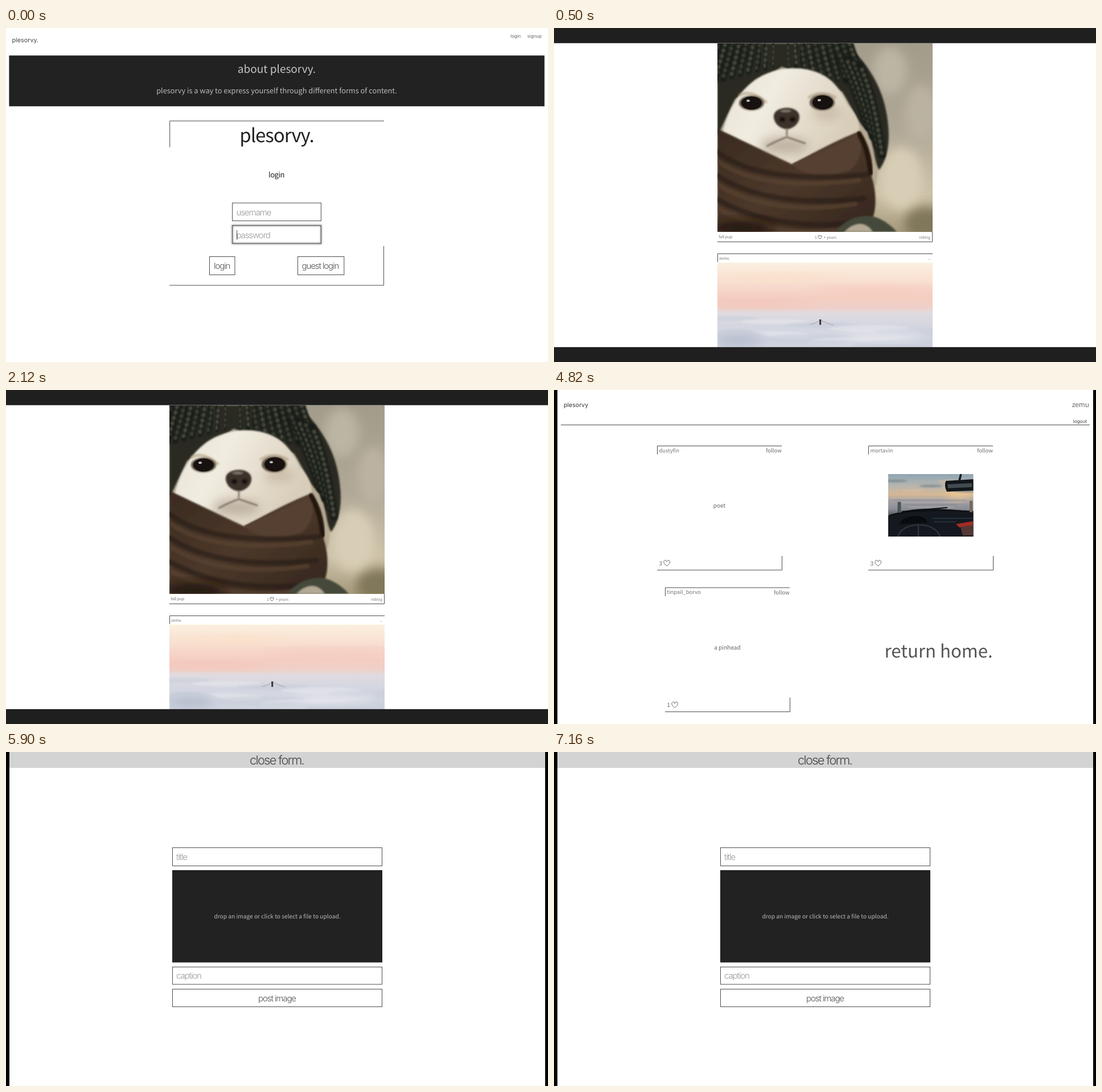
Write an HTML page that moves like this. It is 952x588 px and loops after 8000 ms.

```html
<!DOCTYPE html>
<html lang="en">
<head>
<meta charset="utf-8">
<title>plesorvy</title>
<style>
html, body { margin: 0; width: 100%; height: 100%; overflow: hidden; background: #fff; }
svg { display: block; width: 100vw; height: 100vh; }
text { font-family: 'Noto Sans CJK SC', 'Noto Sans CJK JP', 'Noto Sans', sans-serif; font-weight: 300; text-rendering: geometricPrecision; white-space: pre; }
.ui { font-family: Inter, Roboto, sans-serif; }
.reg { font-weight: 400; }
.line { fill: none; stroke: #4c4c4c; stroke-width: 1; }
</style>
</head>
<body>
<svg id="stage" viewBox="0 0 952 588">
<defs>
  <filter id="soft" x="-20%" y="-20%" width="140%" height="140%"><feGaussianBlur stdDeviation="1.6"/></filter>
  <filter id="haze" x="-50%" y="-50%" width="200%" height="200%"><feGaussianBlur stdDeviation="9"/></filter>
  <clipPath id="pupClip"><rect x="287" y="27" width="378" height="332"/></clipPath>
  <clipPath id="skyClip"><rect x="287" y="413" width="378" height="149"/></clipPath>
  <clipPath id="carClip"><rect x="587" y="148" width="149.5" height="110"/></clipPath>
  <linearGradient id="wall" x1="0" y1="0" x2="0" y2="1">
    <stop offset="0" stop-color="#a39c8b"/><stop offset=".45" stop-color="#b0a897"/>
    <stop offset=".8" stop-color="#cdc2a8"/><stop offset="1" stop-color="#a69b7d"/>
  </linearGradient>
  <linearGradient id="fur" x1="0" y1="0" x2="1" y2=".4">
    <stop offset="0" stop-color="#e9e2d4"/><stop offset=".4" stop-color="#f1ece1"/><stop offset="1" stop-color="#d8cdb9"/>
  </linearGradient>
  <linearGradient id="scarf" x1="0" y1="0" x2="1" y2="1">
    <stop offset="0" stop-color="#3a2a20"/><stop offset=".5" stop-color="#4c382a"/><stop offset="1" stop-color="#33251c"/>
  </linearGradient>
  <linearGradient id="sky" x1="0" y1="0" x2="0" y2="1">
    <stop offset="0" stop-color="#fbf0e0"/><stop offset=".2" stop-color="#f9e1d2"/>
    <stop offset=".42" stop-color="#f4cdc1"/><stop offset=".53" stop-color="#efd0c8"/>
    <stop offset=".6" stop-color="#dfdbe0"/><stop offset=".75" stop-color="#d3d6e0"/><stop offset="1" stop-color="#d8dbe4"/>
  </linearGradient>
  <linearGradient id="dusk" x1="0" y1="0" x2="0" y2="1">
    <stop offset="0" stop-color="#8fa6b4"/><stop offset=".2" stop-color="#b9b6ad"/>
    <stop offset=".33" stop-color="#d6b795"/><stop offset=".42" stop-color="#a3a1a3"/>
    <stop offset=".56" stop-color="#8b8d96"/><stop offset=".66" stop-color="#59595c"/>
  </linearGradient>
</defs>
</svg>
<script>
const stage = document.getElementById('stage');
const LOOP = 8000;
const starts = [0, 500, 3200, 5900];

const text = (x, y, size, str, fill = '#6c6c6c', opt = {}) =>
  `<text x="${x}" y="${y}" font-size="${size}" fill="${fill}" text-anchor="${opt.at || 'start'}" class="${opt.cls || ''}" letter-spacing="${opt.ls || 0}">${str}</text>`;
const ui = (x, y, size, str, fill, opt = {}) => text(x, y, size, str, fill, { cls: 'ui', ...opt });
const field = (x, y, str, fill = '#555', opt = {}) => ui(x, y, 15, str, fill, { ls: -1.1, ...opt });
const rect = (x, y, w, h, fill) => `<rect x="${x}" y="${y}" width="${w}" height="${h}" fill="${fill}"/>`;
const box = (x, y, w, h) => `<rect class="line" x="${x}" y="${y}" width="${w}" height="${h}"/>`;
const line = d => `<path class="line" d="${d}"/>`;
const shape = (d, fill, extra = '') => `<path d="${d}" fill="${fill}" ${extra}/>`;
const stroke = (d, color, w, extra = '') => `<path d="${d}" fill="none" stroke="${color}" stroke-width="${w}" stroke-linecap="round" ${extra}/>`;
const oval = (x, y, rx, ry, fill, extra = '') => `<ellipse cx="${x}" cy="${y}" rx="${rx}" ry="${ry}" fill="${fill}" ${extra}/>`;
const heart = (x, y, s) => `<path transform="translate(${x} ${y}) scale(${s})" fill="none" stroke="#555" stroke-width="${0.9 / s}" d="M0 .9C-1.25 .1-1.05-.82-.5-.82C-.2-.82 0-.6 0-.35C0-.6 .2-.82 .5-.82C1.05-.82 1.25 .1 0 .9Z"/>`;
const repeat = (n, f) => Array.from({ length: n }, (_, i) => f(i)).join('');
const SOFT = 'filter="url(#soft)"', HAZE = 'filter="url(#haze)"';
const sides = rect(0, 0, 6, 588, '#000') + rect(947, 0, 5, 588, '#000');

function loginPage() {
  return rect(0, 0, 952, 588, '#fff') +
    ui(10.5, 25, 10.8, 'plesorvy.', '#444', { cls: 'ui reg' }) +
    ui(886, 16.5, 8, 'login', '#666', { cls: 'ui reg' }) +
    ui(941, 16.5, 8, 'signup', '#666', { cls: 'ui reg', at: 'end' }) +
    rect(5.4, 48.4, 940.4, 89.4, '#222') +
    text(475.5, 78.5, 19, 'about plesorvy.', '#c6c6c6', { at: 'middle' }) +
    text(475.5, 114.5, 12.75, 'plesorvy is a way to express yourself through different forms of content.', '#bcbcbc', { at: 'middle' }) +
    line('M287.7 210V163.7H664M663.5 384V453H287') +
    text(475.5, 201, 33.1, 'plesorvy.', '#222', { at: 'middle', cls: 'reg', ls: -1.07 }) +
    text(475, 262.5, 13, 'login', '#222', { at: 'middle', cls: 'reg', ls: -0.5 }) +
    box(397.6, 308, 155.8, 31.5) + field(404.5, 329.5, 'username', '#999') +
    `<rect x="397.5" y="347.5" width="156" height="32" fill="none" stroke="#999" stroke-width="2.4" ${SOFT}/>` +
    box(397.7, 347.7, 155.6, 31.6) +
    field(404.5, 369.5, 'password', '#999') + line('M405.5 356V372') +
    box(357.5, 402.5, 44.5, 32) + field(365, 424, 'login') +
    box(512.5, 402.5, 81.3, 32) + field(519.5, 424, 'guest login');
}

function pupPhoto() {
  const knit = (d, i, extra = '') => stroke(d, '#191a14', 13, SOFT) +
    stroke(d, i % 2 ? '#46473a' : '#3b3d31', 7, `stroke-dasharray="1 9" stroke-dashoffset="${i * 4}" ${SOFT}`);
  return '<g clip-path="url(#pupClip)">' + rect(287, 27, 378, 332, 'url(#wall)') +
    oval(590, 75, 30, 42, '#bcb5a4', HAZE) + oval(645, 150, 28, 50, '#bbb3a2', HAZE) +
    oval(610, 265, 38, 55, '#d8ceb6', HAZE) + oval(655, 345, 40, 30, '#81775a', HAZE) +
    shape('M520 130C560 165 575 220 566 275L545 300L500 190Z', '#b5a993', SOFT) +
    shape('M287 27H512C545 55 572 95 582 140C592 185 590 225 571 250C561 232 564 205 549 180C530 163 524 140 506 112L400 68L318 125L287 190Z', '#292920', SOFT) +
    repeat(20, i => {
      const x = 290 + i * 12, bend = (i - 9) * 2.5;
      return knit(`M${x} 24q${bend * 0.3} 22 ${bend} ${36 + Math.abs(i - 9) * 4}`, i);
    }) +
    repeat(4, i => knit(`M${502 + i * 12} ${48 + i * 6}Q${530 + i * 11} ${108 + i * 5} ${552 + i * 8} ${175 + i * 16}`, i)) +
    shape('M296 184C304 152 320 118 346 97C370 76 410 66 445 73C480 80 500 100 516 135C530 150 541 170 535 188L420 240L370 216Z', 'url(#fur)', SOFT) +
    stroke('M326 118Q345 108 372 130M448 122Q470 108 494 122', '#a89679', 5, `opacity=".55" ${SOFT}`) +
    oval(480, 150, 26, 12, '#cabda8', HAZE) +
    oval(405, 207, 42, 14, '#bdb2a2', HAZE) +
    oval(347, 132, 22, 13, '#5f5142', SOFT) + oval(347, 132, 18, 11.5, '#17120f') +
    oval(471, 131, 22, 14, '#5f5142', SOFT) + oval(472, 131, 18, 12.5, '#17120f') +
    oval(341, 128, 3, 2, '#bbb') + oval(466, 127, 3, 2, '#bbb') +
    shape('M386 154C388 137 429 135 431 155C432 169 418 178 409 178C398 178 385 168 386 154Z', '#3a302b', SOFT) +
    oval(401, 161, 5, 4, '#140f0d', SOFT) + oval(419, 161, 5, 4, '#140f0d', SOFT) + oval(407, 146, 10, 3, '#796e66', SOFT) +
    stroke('M409 178V189M374 208Q392 198 409 192Q426 198 441 203', '#786a5c', 2.5, SOFT) +
    shape('M287 177C325 196 380 222 418 240C455 220 500 196 536 182C552 200 562 232 558 262C567 290 566 318 560 334C540 348 520 352 500 359H287Z', 'url(#scarf)', SOFT) +
    shape('M418 240C460 220 510 200 535 184C544 205 540 235 520 250C480 266 440 262 418 240Z', '#553f30', SOFT) +
    repeat(3, i => {
      const y = 218 + i * 42, fold = `Q${360 + i * 15} ${y + 58} ${550 - i * 6} ${y + 40}`;
      return stroke(`M287 ${y}${fold}`, '#261a12', 9, `opacity=".6" ${SOFT}`) +
        stroke(`M287 ${y + 16}Q${365 + i * 15} ${y + 72} ${535 - i * 6} ${y + 50}`, '#5c4533', 8, `opacity=".6" ${SOFT}`);
    }) +
    stroke('M536 186Q552 215 556 255', '#21150d', 8, SOFT) +
    oval(330, 352, 55, 12, '#21170f', HAZE) +
    shape('M495 359C510 335 545 326 565 333C580 338 595 350 602 359Z', '#454a3b', SOFT) +
    shape('M510 359C525 342 548 338 560 359Z', '#b3a893', SOFT) + '</g>';
}

function skyPhoto() {
  return '<g clip-path="url(#skyClip)">' + rect(287, 413, 378, 149, 'url(#sky)') +
    oval(400, 440, 110, 6, '#f9e0c8', HAZE) + oval(570, 462, 120, 6, '#f4cabd', HAZE) +
    oval(350, 486, 110, 5, '#f6c3b5', HAZE) +
    repeat(9, i => oval(305 + i * 83 % 350, 511 + i * 6, 55 + i * 5, 4 + i * 0.7, i % 2 ? '#e8e8ed' : '#c6ccd9', `opacity=".5" ${SOFT}`)) +
    shape('M287 535Q320 523 355 536T430 549T530 551T665 537V562H287Z', '#c9cfdb', `opacity=".6" ${SOFT}`) +
    oval(325, 549, 42, 9, '#b2bacb', HAZE) + oval(580, 543, 70, 7, '#e6e6ec', HAZE) +
    stroke('M468 514Q460 520 450 522M468 514Q478 520 490 523', '#a18d91', 0.8) +
    rect(466.2, 513, 3, 9.5, '#382f38') + '</g>';
}

function feedPage() {
  return rect(0, 0, 952, 588, '#fff') + pupPhoto() +
    line('M664.5 359V376.5H287M287.5 412V397.5H665') +
    text(289.5, 370, 6.8, 'fall pup') +
    text(458, 370.5, 6.8, '1') + heart(467, 368, 3.5) +
    text(496, 370.5, 6.6, '+ yours', '#6c6c6c', { at: 'end' }) +
    text(661, 370.5, 6.65, 'reblog', '#777', { at: 'end' }) +
    text(290, 407.5, 7, 'zemu', '#777') + text(662, 407.5, 7, '...', '#555', { at: 'end' }) +
    skyPhoto() + rect(0, 0, 952, 26.7, '#1f1f1f') + rect(0, 561.8, 952, 26.2, '#1f1f1f');
}

function card(x, y, name, likes) {
  return `<g transform="translate(${x} ${y})">` +
    line('M.5 15.5V.5H219M219.5 194V219H0') +
    text(3.5, 11.5, 9.4, name, '#757575') + text(219, 12, 9.6, 'follow', '#6c6c6c', { at: 'end' }) +
    text(3.5, 210.5, 10.2, likes) + heart(17.2, 206.5, 5.8) + '</g>';
}

function carPhoto() {
  return '<g clip-path="url(#carClip)">' + rect(587, 148, 150, 110, 'url(#dusk)') +
    oval(712, 180, 24, 10, '#f0c893', HAZE) +
    repeat(5, i => oval(600 + i * 31, 160 + i * 17 % 25, 20, 2.5, i % 2 ? '#d8bea0' : '#76838d', `opacity=".7" ${SOFT}`)) +
    repeat(5, i => stroke(`M${587 + i * 9} ${190 + i * 4}H${730 - i * 7}`, i % 2 ? '#7b7f89' : '#c3bab4', 1.2, 'opacity=".7"')) +
    shape('M587 222Q620 208 665 209T737 215V258H587Z', '#15191f') +
    stroke('M589 221Q630 208 736 214M612 214L690 207', '#0b0e12', 2) +
    shape('M607 236Q612 222 635 222Q654 222 656 234Z', '#080b10') +
    stroke('M604 260C608 230 674 230 678 260M640 240V258', '#303841', 2.2) +
    stroke('M665 226H735M668 232H705', '#273846', 1.5) +
    shape('M706 236L736 231V239L712 242Z', '#a22c27') + shape('M714 241L736 238V256H718Z', '#533734') +
    rect(603.5, 197, 6, 19, '#4b5459') + rect(730, 195, 5, 20, '#75685c') +
    stroke('M711 164L715 147', '#14171a', 3.5) +
    shape('M688 160L737 157V177L690 179Q685 170 688 160Z', '#12161a') +
    shape('M691 166L734 164V171L692 173Z', '#414b50') + '</g>';
}

function peoplePage() {
  return rect(0, 0, 952, 588, '#fff') + sides +
    ui(17, 29.5, 10.6, 'plesorvy', '#333', { cls: 'ui reg' }) +
    text(940, 29.5, 11.9, 'zemu', '#666', { at: 'end' }) +
    ui(936, 58, 8.2, 'logout', '#444', { cls: 'ui reg', at: 'end' }) +
    line('M12 61.5H941') +
    card(181, 98, 'dustyfin', '3') + card(552, 98, 'mortavin', '3') + card(195, 347.5, 'tinpail_borvo', '1') +
    text(290.5, 207, 10, 'poet', '#666', { at: 'middle' }) +
    text(304.5, 456.5, 10.1, 'a pinhead', '#666', { at: 'middle' }) +
    carPhoto() + text(580.5, 470.5, 31.2, 'return home.', '#555');
}

function formPage() {
  return rect(0, 0, 952, 588, '#fff') + rect(6, 0, 941, 28, '#d3d3d3') + sides +
    ui(475.5, 22, 21.8, 'close form.', '#444', { at: 'middle', ls: -1.65 }) +
    box(292.5, 168.5, 368, 32) + field(299, 189.5, 'title', '#999') +
    rect(292, 208, 369, 162.5, '#222') +
    text(476.5, 293, 10.16, 'drop an image or click to select a file to upload.', '#b8b8b8', { at: 'middle' }) +
    box(292.5, 378.5, 368, 30.5) + field(299, 399, 'caption', '#999') +
    box(292.5, 417.5, 368, 31) + field(476, 438.5, 'post image', '#555', { at: 'middle' });
}

const pages = [loginPage, feedPage, peoplePage, formPage];
stage.insertAdjacentHTML('beforeend', pages.map(p => `<g class="page">${p()}</g>`).join(''));
const groups = stage.querySelectorAll('.page');

function render(t) {
  const now = starts.filter(s => s <= t).length - 1;
  groups.forEach((g, i) => g.setAttribute('display', i === now ? 'inline' : 'none'));
}

const begin = performance.now();
function tick() {
  render((performance.now() - begin) % LOOP);
  requestAnimationFrame(tick);
}
tick();
</script>
</body>
</html>
```
